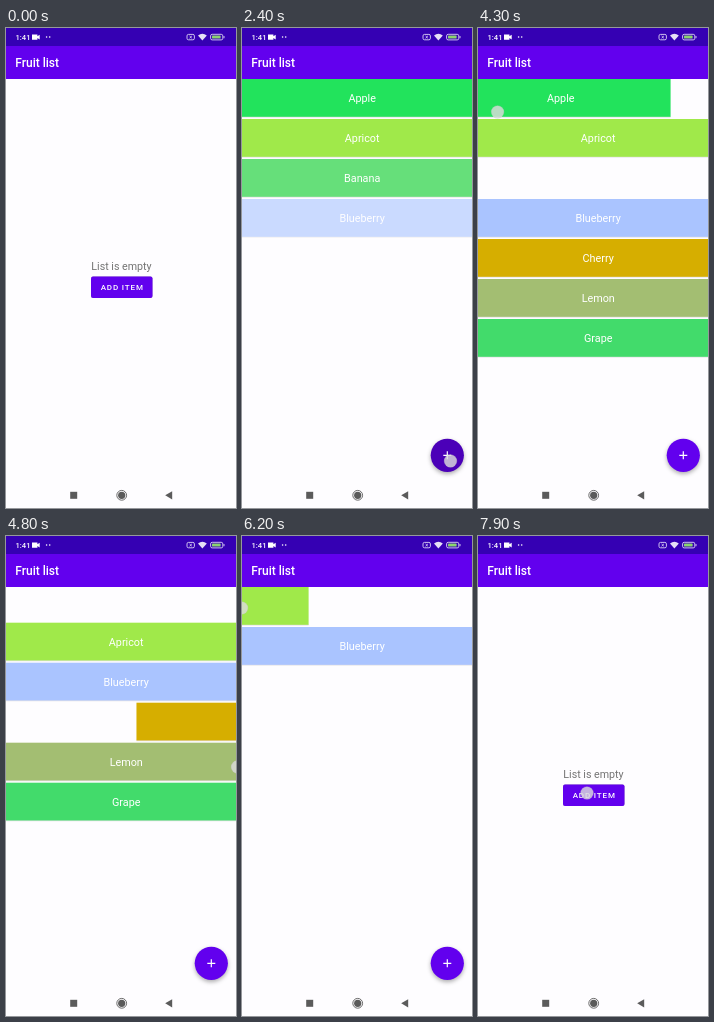
Animation, 230 px wide and 480 px high, one loop 8 s. Source, as an HTML page:

```html
<!DOCTYPE html>
<html lang="en">
<head>
<meta charset="utf-8">
<title>Fruit list</title>
<style>
  html, body { margin: 0; width: 100%; height: 100%; overflow: hidden; background: #fefdff; }
  svg { display: block; width: 230px; height: 480px; font-family: Roboto, "Liberation Sans", sans-serif; }
  .mid { text-anchor: middle; }
  #fab circle { filter: drop-shadow(0 2px 2px rgba(0, 0, 0, .32)); }
  #button { filter: drop-shadow(0 .7px .6px rgba(0, 0, 0, .3)); }
</style>
</head>
<body>
<svg viewBox="0 0 230 480">
  <rect width="230" height="480" fill="#fefdff"/>
  <g id="list"></g>
  <g id="empty">
    <text class="mid" x="115.5" y="242.3" font-size="10.7" fill="#747474">List is empty</text>
    <rect id="button" x="85" y="248.6" width="61.5" height="21.4" rx="2" fill="#6200ee"/>
    <text class="mid" x="116.2" y="262.3" font-size="8" font-weight="500" letter-spacing=".85" fill="#fff">ADD ITEM</text>
  </g>
  <g id="fab">
    <circle r="16.6" fill="#6200ee"/>
    <path d="M-4 0H4M0-4V4" stroke="#fff" stroke-width="1.2"/>
  </g>

  <rect y="17" width="230" height="34" fill="#6200ee"/>
  <rect width="230" height="18" fill="#3500b3"/>
  <text x="9.3" y="39" font-size="12" font-weight="500" fill="#fff">Fruit list</text>

  <g fill="#fff">
    <text x="9.5" y="11.8" font-size="7.6" font-weight="500">1:41</text>
    <path d="M26 6.5h5.4v1.7l2.3-1.5v4.8l-2.3-1.5v1.7H26z"/>
    <circle cx="40.6" cy="9" r=".8"/>
    <circle cx="43.7" cy="9" r=".8"/>
    <path d="M192 7.4q4.4-3.5 8.8 0l-4.4 5.1z" opacity=".88"/>
  </g>
  <g fill="none" stroke="#ddd4f4" stroke-width=".9">
    <rect x="181" y="6.4" width="7.4" height="5.4" rx="1.5"/>
    <path d="M183.6 8l2.2 2.2m0-2.2l-2.2 2.2"/>
    <rect x="204.6" y="6.3" width="12.2" height="5.6" rx="1.6"/>
    <path d="M218 8v2.2"/>
  </g>
  <rect x="206" y="7.6" width="8.6" height="3" rx=".6" fill="#8bd36e"/>

  <g fill="#5b5b5b">
    <rect x="64.2" y="463.8" width="7" height="7"/>
    <circle cx="115.7" cy="467.3" r="3.6"/>
    <circle cx="115.7" cy="467.3" r="4.9" fill="none" stroke="#5b5b5b" stroke-width=".9"/>
    <path d="M166.2 463.2v8.2l-7-4.1z"/>
  </g>
  <circle id="touch" r="6.3" fill="#dcdcdc" fill-opacity=".82" stroke="#c4c4c4" stroke-opacity=".5" stroke-width=".6"/>
</svg>
<script>
const LOOP = 8000, WIDTH = 230, PITCH = 40;
const $ = id => document.getElementById(id);
const ramp = (t, from, to) => Math.min(1, Math.max(0, (t - from) / (to - from)));
const smooth = p => p * p * (3 - 2 * p);

// Swipe: start and end time, direction, finger x and y at touch-down
const rows = [
  { name: "Apple", color: "#22e35c", add: 700, swipe: [4180, 4480, -1, 57, 84] },
  { name: "Apricot", color: "#a0e94a", add: 1810, swipe: [5965, 6245, -1, 163, 72] },
  { name: "Banana", color: "#66df7a", add: 2060, swipe: [3700, 4050, 1, 75, 152] },
  { name: "Blueberry", color: "#aac4ff", add: 2310, swipe: [6380, 6700, 1, 90, 108] },
  { name: "Cherry", color: "#d6ae00", add: 2560, swipe: [4560, 4880, 1, 101, 231] },
  { name: "Lemon", color: "#a3be72", add: 2810, swipe: [5020, 5320, 1, 95, 190] },
  { name: "Grape", color: "#42db6b", add: 3070, swipe: [5450, 5770, 1, 90, 190] }
];

$("list").innerHTML = rows.map(r => `<g>
  <rect y="37" width="230" height="1.6" fill="#000" opacity=".1"/>
  <rect width="230" height="37.8" fill="${r.color}"/>
  <text class="mid" x="120.2" y="23.3" font-size="10.8" fill="#fff">${r.name}</text></g>`).join("");
rows.forEach((r, i) => r.node = $("list").children[i]);

const swipeOffset = ({ swipe: [from, to, dir] }, t) => dir * WIDTH * ramp(t, from, to) ** 2;

function fingerAt(t) {
  if (t >= 400 && t < 560 || t >= 7860) return [109, 257];
  for (const r of rows.slice(1))
    if (t >= r.add - 110 && t < r.add + 110) return [208.5, 433];
  for (const r of rows) {
    const [from, to, , x, y] = r.swipe;
    const lead = r.name === "Banana" ? 300 : 70;
    if (t >= from - lead && t < to) {
      const fx = x + swipeOffset(r, t);
      if (fx > -7 && fx < WIDTH + 7) return [fx, y];
    }
  }
  return null;
}

function draw(t) {
  let shift = 0;
  rows.forEach((r, i) => {
    const end = r.swipe[1];
    r.node.setAttribute("transform", `translate(${swipeOffset(r, t)} ${51 + PITCH * i - shift})`);
    r.node.setAttribute("opacity", t < end ? ramp(t, r.add, r.add + 150) : 0);
    shift += PITCH * smooth(ramp(t, end + 270, end + 520));
  });

  $("empty").setAttribute("opacity", t < 4000 ? 1 - ramp(t, 650, 800) : ramp(t, 6980, 7300));
  const size = smooth(ramp(t, 750, 1000)) * (1 - smooth(ramp(t, 6850, 7000)));
  $("fab").setAttribute("transform", `translate(205.3 427.3) scale(${size})`);

  const finger = fingerAt(t);
  const pressed = finger && finger[1] === 433;
  $("fab").firstElementChild.setAttribute("fill", pressed ? "#4b00b8" : "#6200ee");
  $("touch").setAttribute("visibility", finger ? "visible" : "hidden");
  if (finger) $("touch").setAttribute("transform", `translate(${finger})`);
}

const start = performance.now();
function tick() {
  draw((performance.now() - start) % LOOP);
  requestAnimationFrame(tick);
}
tick();
</script>
</body>
</html>
```
